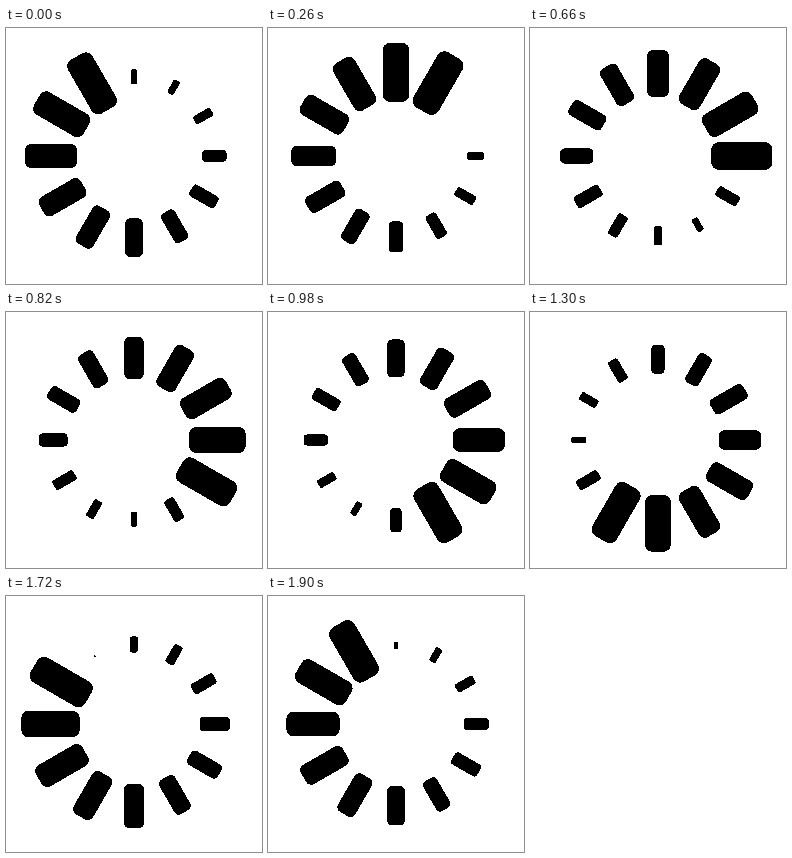
Write an HTML page that moves like this. It is 256 px wide and 256 px high and loops after 1.92 s.

```html
<!DOCTYPE html>
<html lang="en">
<head>
<meta charset="utf-8">
<title>Spinner</title>
<style>
  html, body { margin: 0; height: 100%; overflow: hidden; background: #fff; }
  svg { display: block; width: 100vmin; height: 100vmin; }
</style>
</head>
<body>
<svg viewBox="-128 -128 256 256" shape-rendering="crispEdges"></svg>
<script>
const LOOP = 1920, BARS = 12, STEP = 20;
const LEAD = 64;   // ms by which a bar starts before its turn
const GROW = 142;  // ms from nothing to full size
const FULL = 64.3;

const svg = document.querySelector("svg");
const bars = Array.from({ length: BARS }, (_, i) => {
  const bar = document.createElementNS(svg.namespaceURI, "rect");
  bar.setAttribute("transform", `rotate(${i * 360 / BARS})`);
  return svg.appendChild(bar);
});

// Length of a bar: quick accelerating growth, then a slow linear shrink.
function barLength(age) {
  return age < GROW ? FULL * (age / GROW) ** 1.85 : FULL - 0.0292 * (age - GROW);
}

function draw(time) {
  bars.forEach((bar, i) => {
    const age = (time + LEAD + LOOP - i * LOOP / BARS) % LOOP;
    const height = barLength(age), width = 0.45 * height + 0.25;
    const radius = 78 + 0.095 * height;
    const box = { x: -width / 2, y: -radius - height / 2, width, height, rx: 0.125 * height };
    for (const name in box) bar.setAttribute(name, box[name]);
  });
}

const start = performance.now();
function tick() {
  const time = (performance.now() - start) % LOOP;
  draw(Math.floor(time / STEP) * STEP);
  requestAnimationFrame(tick);
}
tick();
</script>
</body>
</html>
```
